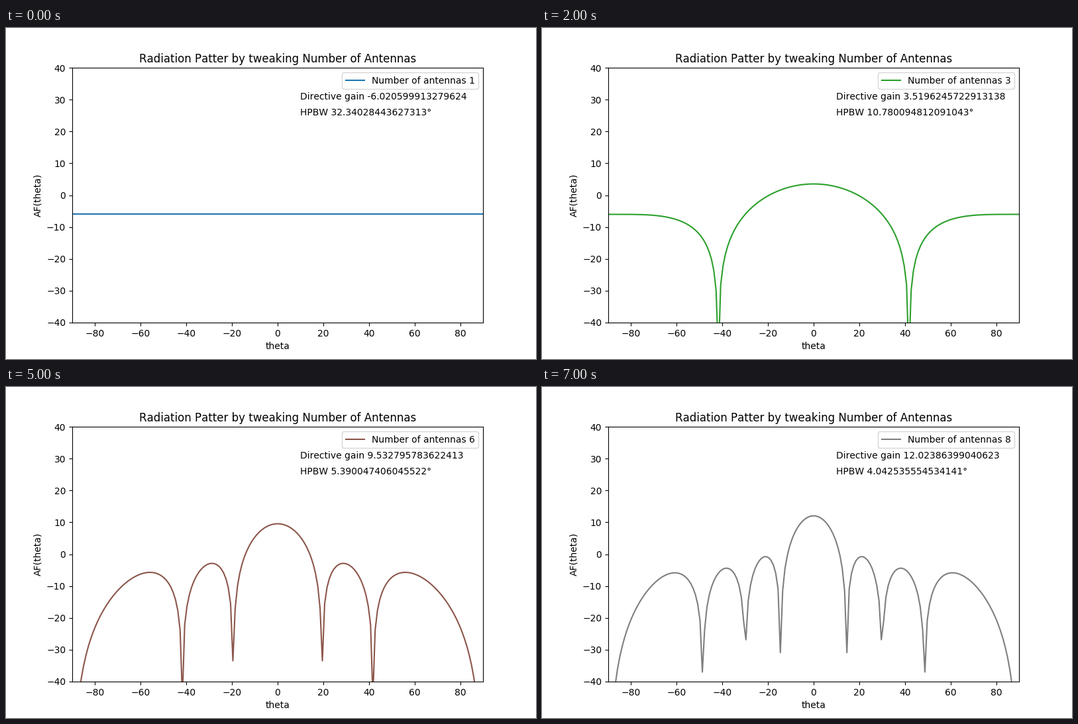
Animation of 800 by 500 pixels, one loop 8 s. Source, as a matplotlib script:

```python
import numpy as np
import matplotlib.pyplot as plt
from matplotlib.animation import FuncAnimation

MAX_ANTENNAS = 8
BEAM_WIDTH = 101.6 / np.pi  # half-power width of one antenna

# Whole-pixel kerning, as in older matplotlib releases.
plt.rcParams["text.kerning_factor"] = 6

theta = np.linspace(-np.pi / 2, np.pi / 2, 180)
degrees = np.degrees(theta)


def array_factor(n):
    """Gain in dB of n antennas spaced half a wavelength apart."""
    half_phase = np.pi / 2 * np.sin(theta)
    factor = np.sin(n * half_phase) / (2 * np.sin(half_phase))
    return 20 * np.log10(np.abs(factor))


fig, ax = plt.subplots(figsize=(8, 5), dpi=100)
ax.set(xlim=(-90, 90), ylim=(-40, 40), xlabel="theta", ylabel="AF(theta)",
       title="Radiation Patter by tweaking Number of Antennas")
line, = ax.plot([], [])
gain_text = ax.text(10, 30, "")
width_text = ax.text(10, 25, "")


def update(frame):
    n = frame + 1
    gain = array_factor(n)
    line.set_data(degrees, gain)
    line.set_color(f"C{frame}")
    line.set_label(f"Number of antennas {n}")
    gain_text.set_text(f"Directive gain {gain.max()}")
    width_text.set_text(f"HPBW {BEAM_WIDTH / n}°")
    legend = ax.legend(loc="upper right")
    return line, gain_text, width_text, legend


anim = FuncAnimation(fig, update, frames=MAX_ANTENNAS, interval=1000,
                     repeat=True)
plt.show()
```
